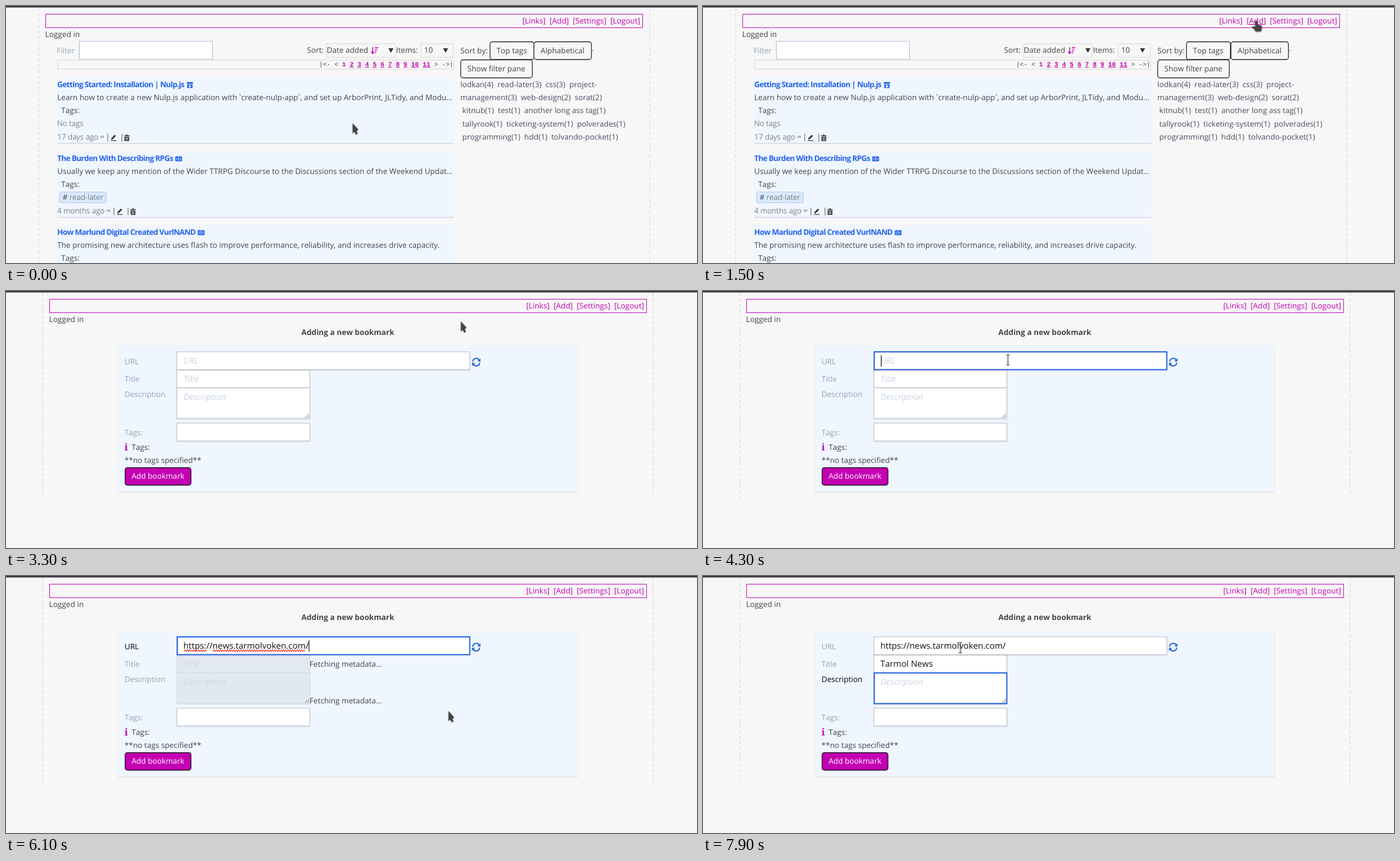
An HTML page that plays this animation: 1227 by 456 pixels, repeating every 8000 ms.

```html
<!DOCTYPE html>
<html lang="en">
<head>
<meta charset="utf-8">
<title>Bookmarks</title>
<style>
  html, body { margin: 0; width: 100%; height: 100%; overflow: hidden; background: #f7f7f7; }
  svg { display: block; width: 1227px; height: 456px; }
  text { font: 13.6px "Open Sans", sans-serif; font-kerning: none; fill: #444; white-space: pre; text-rendering: geometricPrecision; }
  .bold { font-weight: 700; }
  .light { font-weight: 300; }
  .title { font-weight: 700; letter-spacing: -.05em; fill: #2563eb; }
  .pink { fill: #c400b3; }
  .muted { fill: #94a3b8; }
  .tag { fill: #475060; }
  .mid { text-anchor: middle; }
  .dark { fill: #333; }
  .tick { font-family: "Noto Sans", sans-serif; }
  .mono { font: 11.33px "Liberation Mono", monospace; }
  .mono tspan { font-weight: 700; fill: #c400b3; }
  .mono .u { text-decoration: underline; }
  .entry { font-size: 15.2px; fill: #111; }
  .hint { font-size: 15.2px; font-style: italic; fill: #cbd5e1; }
  .info { font: bold 17px "Noto Serif", serif; }
  .button { fill: #f7f7f7; stroke: #222; stroke-width: 1.3; }
  .select { fill: #f7f7f7; stroke: #e6e6e6; stroke-width: 2; }
  .field { fill: #fff; stroke: #bbbfca; filter: drop-shadow(0 1px 1px #0002); }
  .card { fill: #eff6ff; }
  .edge { fill: #d3dae6; }
  .raised { filter: drop-shadow(0 1px 1px #0002); }
  .dash { stroke: #e2e4ec; stroke-width: 2; stroke-dasharray: 6 4; }
  .blue { fill: none; stroke: #1d5fdc; stroke-width: 2; }
  #pointer { filter: drop-shadow(0 1px 1px #0005); }
</style>
</head>
<body>
<svg id="stage" viewBox="0 0 1227 456"></svg>
<script>
const text = (x, y, s, cls = '', extra = '') => `<text x="${x}" y="${y}" class="${cls}" ${extra}>${s}</text>`;
const rect = (x, y, w, h, cls = '', extra = '') =>
  `<rect x="${x}" y="${y}" width="${w}" height="${h}" class="${cls}" ${extra}/>`;
const path = (d, extra = '') => `<path d="${d}" ${extra}/>`;
const group = (id, body, extra = '') => `<g id="${id}" ${extra}>${body}</g>`;
const at = (x, y, body) => `<g transform="translate(${x} ${y})">${body}</g>`;

const archive = path('M0 0H11V3H0ZM.7 4H10.3V10.5H.7Z', 'fill="#2563eb"') +
  path('M5.5 4.6V8M3.3 6.6L5.5 9 7.7 6.6', 'fill="none" stroke="#fff" stroke-width="1.2"');
const book = path('M0 1.5Q3-.5 6 1.5 9-.5 12 1.5V9.5H7L6 10.5 5 9.5H0Z', 'fill="#2563eb"') +
  path('M6 2V9M1.7 4H4.5M1.7 6.3H4.5M7.5 4H10.3M7.5 6.3H10.3', 'stroke="#eff6ff" stroke-width=".9"');
const pencil = path('M1 6.5L7 .5 9.2 2.7 3.2 8.6.6 9ZM0 10.3H10V11.5H0Z', 'class="dark"');
const trash = path('M0 1.5H3L3.7.3H6.3L7 1.5H10V2.8H0ZM.8 3.8H9.2V11.5H.8Z', 'class="dark"') +
  path('M3.3 5V10M5 5V10M6.7 5V10', 'stroke="#eff6ff" stroke-width=".8"');
const refresh = path('M2 6.5A6 5.5 0 0 1 13.5 4M14 8A6 5.5 0 0 1 2.5 10.5', 'class="blue"') +
  path('M15.5.5V6H10ZM.5 14V8.5H6Z', 'fill="#1d5fdc"');

function card(y, title, icon, iconX, desc, tags, age, dx) {
  const meta = text(91, 110, age, 'light') + text(167 + dx, 109, '∞', 'light', 'style="font-size:11px"') +
    text(177 + dx, 110, '|') + at(186 + dx, 101, pencil) + text(202 + dx, 110, '|') + at(209.5 + dx, 101, trash);
  return at(0, y, rect(91, 0, 705, 116, 'card') + rect(91, 116, 705, 1.6, 'edge') +
    text(91, 17, title, 'title') + at(iconX, 8, icon) +
    text(91, 40, desc) + text(98, 63, 'Tags:') + tags + meta);
}

const chip = rect(95.5, 72, 82.5, 19, '', 'rx="3" fill="#dbeafe" stroke="#a8bfe9"') +
  text(100.5, 86, '# <tspan class="light">read-later</tspan>');
const pages = [...Array(10)].map((_, i) => `<tspan class="u">${i + 2}</tspan>`).join(' ');
const tick = '<tspan class="tick">`</tspan>';

const header = rect(70.5, 14.5, 1060, 24, '', 'fill="none" stroke="#c400b3"') +
  text(916.8, 31, '[Links]  [<tspan id="add">Add</tspan>]  [Settings]  [Logout]', 'pink') +
  text(69.6, 55, 'Logged in');

const list = path('M58 3V456M1143 3V456', 'class="dash"') +
  text(90, 84, 'Filter', 'muted') +
  rect(130.5, 62.5, 236, 32, 'field', 'style="stroke:#b4bfdc"') +
  text(534.5, 83, 'Sort:') + rect(569, 67, 122, 24, 'select') + text(569.5, 83, 'Date added') +
  path('M651 73V84M648.5 81L651 84.5 653.5 81M655 74H661M655 77.5H659.5M655 81H658M655 84H656.5',
    'fill="none" stroke="#c400b3" stroke-width="1.5"') +
  text(692.5, 83, 'Items:') + rect(737, 67, 57, 24, 'select') + text(742.5, 83, '10') +
  path('M679 75H688L683.5 83Z M776 75H785L780.5 83Z', 'class="dark"') +
  rect(92, 96, 703, 16, 'select') +
  text(556, 107, `|&lt;- &lt; <tspan>1</tspan> ${pages} &gt; -&gt;|`, 'mono') +
  text(807, 84, 'Sort by:') + text(1040, 84, '·') +
  group('top', rect(859.5, 63.5, 78, 31.5, 'button', 'rx="4"') + text(898, 84, 'Top tags', 'mid')) +
  rect(807.5, 95.5, 127, 32, 'button', 'rx="4"') + text(870.7, 116, 'Show filter pane', 'mid') +
  group('alpha', rect(937.5, 63.5, 102, 31.5, 'button', 'rx="4" id="alphaBox"') +
    text(988.3, 84, 'Alphabetical', 'mid')) +
  ['lodkan(4)  read-later(3)  css(3)  project-',
   'management(3)  web-design(2)  sorat(2)',
   ' kitnub(1)  test(1)  another long ass tag(1)',
   ' tallyrook(1)  ticketing-system(1)  polverades(1)',
   ' programming(1)  hdd(1)  tolvando-pocket(1)']
    .map((s, i) => text(806.8, Math.round(144 + i * 23.2), s, 'tag')).join('') +
  card(127, 'Getting Started: Installation | Nulp.js', archive, 321,
    `Learn how to create a new Nulp.js application with ${tick}create-nulp-app${tick}, and set up ArborPrint, JLTidy, and Modu…`,
    text(91, 86, 'No tags', 'light'), '17 days ago', 0) +
  card(258, 'The Burden With Describing RPGs', book, 300.5,
    'Usually we keep any mention of the Wider TTRPG Discourse to the Discussions section of the Weekend Updat…',
    chip, '4 months ago', 11) +
  card(389, 'How Marlund Digital Created VurlNAND', book, 340.5,
    'The promising new architecture uses flash to improve performance, reliability, and increases drive capacity.',
    '', '', 0);

function squiggle(from, to) {
  let d = `M${from} 134`;
  for (let x = from + 2, up = 1; x <= to; x += 2, up = 1 - up) d += `L${x} ${up ? 131 : 134}`;
  return path(d, 'fill="none" stroke="#e0202a" stroke-width="1.1"');
}

const form = path('M65 3V367M1149 3V367', 'class="dash"') +
  text(607, 78, 'Adding a new bookmark', 'bold mid') +
  rect(199, 97, 816, 259, 'card raised', 'rx="3"') +
  text(210.5, 130, 'URL', '', 'id="urlLabel"') + text(210.5, 161, 'Title', 'muted') +
  text(210.5, 188, 'Description', '', 'id="descLabel"') + text(210.5, 256, 'Tags:', 'muted') +
  rect(303.5, 140, 236, 31.5, 'field', 'id="title"') +
  rect(303.5, 172, 236, 54, 'field', 'id="desc"') +
  rect(303.5, 108, 520, 31.5, 'field') +
  rect(303.5, 234.5, 236, 31.5, 'field') +
  rect(304, 108, 519.5, 31.5, 'blue', 'id="urlFocus"') +
  rect(304, 172, 235.5, 54.5, 'blue', 'id="descFocus"') +
  path('M531 225L538 218M535 225L538 222', 'stroke="#666"') +
  text(315, 129, 'URL', 'hint', 'id="urlHint"') +
  group('url', text(315, 129, 'https://news.tarmolvoken.com/', 'entry')) +
  group('spell', squiggle(316, 356) + squiggle(367, 531)) +
  text(315, 161, 'Title', 'hint', 'id="titleHint"') + text(315, 161, 'Tarmol News', 'entry', 'id="titleText"') +
  text(315, 193, 'Description', 'hint') +
  group('fetching', text(539, 161, 'Fetching metadata...') + text(539, 226, 'Fetching metadata...')) +
  path('M0 0V20', 'id="caret" stroke="#000" stroke-width="1.2"') +
  at(827, 119, refresh) +
  text(210.5, 283, 'i', 'pink info') + text(223, 282, 'Tags:') + text(210.5, 305, '**no tags specified**') +
  rect(211.5, 313.5, 117, 31, '', 'rx="4" fill="#c400b3" stroke="#111" stroke-width="1.3"') +
  text(269.8, 333, 'Add bookmark', 'mid', 'style="fill:#fff"');

const pointer = group('arrow', path('M0 0V17.5L3.5 15.3 6 20 9 18.5 7 14 10 11Z', 'fill="#444"')) +
  group('hand', path('M-2.5 1Q0-1 2 1V7L8 8.5Q10.3 9.5 9.5 13L8 19H-1.5Q-3.5 15-8 11.5-7.5 8.5-2.5 11Z', 'fill="#444"')) +
  group('beam', path('M-3-9H-1Q0-9 0-8 0-9 1-9H3M0-8V8M-3 9H-1Q0 9 0 8 0 9 1 9H3', 'fill="none" stroke="#444" stroke-width="1.1"'));

document.getElementById('stage').innerHTML = rect(0, 0, 1227, 456, '', 'fill="#f7f7f7"') +
  group('list', list) + group('form', form) + group('header', header) +
  rect(0, 0, 1227, 2.6, '', 'fill="#3d3a40"') + group('pointer', pointer);

const $ = id => document.getElementById(id);
const show = (id, on) => $(id).style.display = on ? '' : 'none';
const ramp = (t, from, length) => Math.min(1, Math.max(0, (t - from) / length));
const mix = (a, b, k) => `color-mix(in srgb, ${b} ${k * 100}%, ${a})`;

// Pointer stops: time, x, y
const stops = [
  [200, 615.5, 208], [700, 954, 63], [1100, 972, 41], [1200, 972, 41], [1600, 985, 23.5], [2000, 985, 23.5],
  [2100, 985, 24], [2200, 985, 24], [2300, 985, 25], [2400, 985, 25], [2600, 975, 27], [2800, 975, 27],
  [3700, 688, 73], [4000, 541.5, 122], [5100, 541.5, 122], [5600, 843, 236], [5700, 852, 246], [5800, 852, 246],
  [6800, 545, 216], [6900, 543, 224], [7200, 470, 200], [7600, 457, 131], [7900, 457, 127]];

function pointerAt(t) {
  const i = stops.findIndex(s => s[0] >= t);
  if (i < 1) return stops[i < 0 ? stops.length - 1 : 0].slice(1);
  const [a, b] = [stops[i - 1], stops[i]];
  const k = ramp(t, a[0], b[0] - a[0]), e = k * k * (3 - 2 * k);
  return [a[1] + (b[1] - a[1]) * e, a[2] + (b[2] - a[2]) * e];
}

function draw(now) {
  const t = Math.floor(now % 8000 / 100) * 100;
  const within = (a, b) => t >= a && t < b;

  const onForm = t >= 2900;
  show('list', !onForm);
  show('form', onForm);
  $('header').setAttribute('transform', `translate(${onForm ? 7 : 0} 0)`);
  $('add').style.textDecoration = within(1400, 2900) ? 'underline' : 'none';

  const hover = ramp(t, 500, 200) * (1 - ramp(t, 800, 200));
  const scale = 1 + .05 * hover;
  $('alpha').setAttribute('transform', `translate(988.5 79.2) scale(${scale}) translate(-988.5 -79.2)`);
  $('alphaBox').style.fill = mix('#f7f7f7', '#fff', hover);
  $('alphaBox').style.filter = hover ? `drop-shadow(0 4px 5px rgba(0,0,0,${.22 * hover}))` : 'none';
  $('top').setAttribute('transform', `translate(${t >= 600 ? -1 : 0} 0)`);

  const pasted = t >= 4900, inUrl = within(4300, 7200), inDesc = t >= 7200, fetched = t >= 6200;
  $('urlLabel').style.fill = mix('#94a3b8', '#000', ramp(t, 4300, 300) * (1 - ramp(t, 7200, 300)));
  $('descLabel').style.fill = mix('#94a3b8', '#000', ramp(t, 7200, 300));
  show('urlFocus', inUrl);
  show('descFocus', inDesc);
  show('urlHint', !pasted);
  show('url', pasted);
  show('spell', pasted && inUrl);
  show('titleHint', !fetched);
  show('titleText', fetched);
  show('fetching', within(5000, 6200));

  const disabled = ramp(t, 4900, 300) * (1 - ramp(t, 6100, 300));
  for (const id of ['title', 'desc']) {
    $(id).style.fill = mix('#fff', '#e2e8f0', disabled);
    $(id).style.stroke = mix('#bbbfca', '#d9dfe8', disabled);
  }

  const blinkFrom = inDesc ? 7200 : pasted ? 4900 : 4300;
  show('caret', (inUrl || inDesc) && (t - blinkFrom) % 1000 < 500);
  $('caret').setAttribute('transform', inDesc ? 'translate(316.5 178)' : `translate(${pasted ? 538 : 316.5} 114)`);

  const hand = within(600, 900) || within(1400, 2900);
  const beam = within(3900, 5200) || t >= 7000;
  show('hand', hand);
  show('beam', beam);
  show('arrow', !hand && !beam);
  $('pointer').setAttribute('transform', `translate(${pointerAt(t)})`);
}

function frame() {
  draw(performance.now());
  requestAnimationFrame(frame);
}
frame();
</script>
</body>
</html>
```
